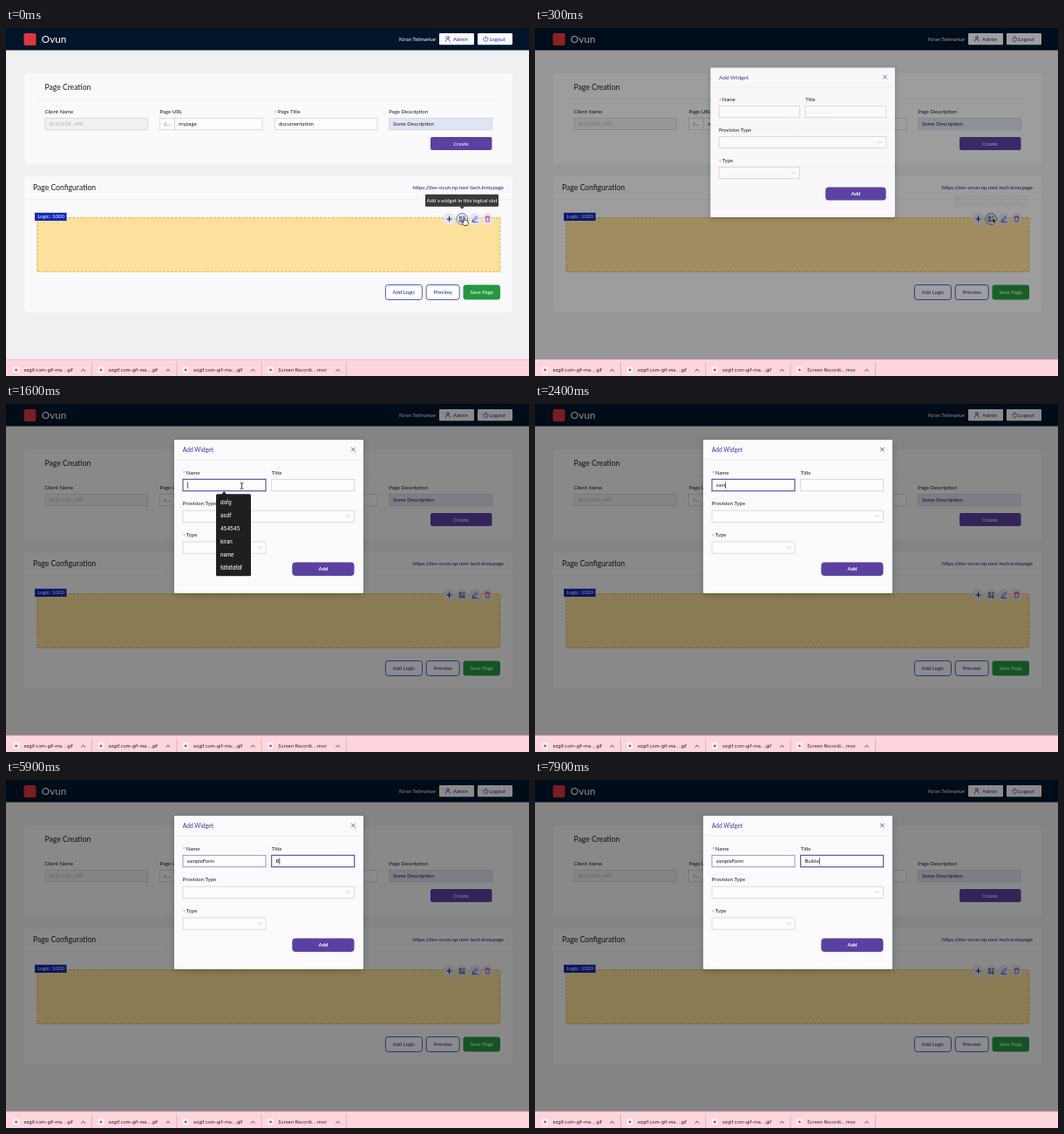
Recreate the animation shown at these times as an HTML page. Size 600 by 399 pixels, loop 8 s.

```html
<!DOCTYPE html>
<html lang="en">
<head>
<meta charset="utf-8">
<title>Page builder</title>
<style>
  html, body { margin: 0; width: 100%; height: 100%; overflow: hidden; background: #f0eff1; }
  svg { display: block; width: 600px; height: 399px; font: 6px Lato, sans-serif; fill: #1d1c25; }
  .line { fill: none; stroke-linecap: round; stroke-linejoin: round; }
  .head { font-size: 8.6px; }
  .card { fill: #faf9fb; }
  .rule { stroke: #ebeaee; stroke-width: .7; }
  .box { fill: #fefdff; stroke: #d3d1d7; stroke-width: .8; }
  .off { fill: #f1f0f2; }
  .mid { text-anchor: middle; }
  .end { text-anchor: end; }
  .white { fill: #fff; }
  .blue { fill: #172a9c; }
  .star { fill: #e5393f; }
  .violet { fill: #5a41a1; }
  .outline { fill: #fdfcff; stroke: #2439bd; stroke-width: .8; }
  .system { font-family: Inter, "Open Sans", sans-serif; font-size: 5.35px; }
  .suggest { font-family: Inter, "Open Sans", sans-serif; font-size: 5.9px; font-weight: 500; fill: #f4f4f6; }
</style>
</head>
<body>
<svg viewBox="0 0 600 399" xmlns="http://www.w3.org/2000/svg">
  <defs>
    <filter id="soft" x="-20%" y="-20%" width="140%" height="150%">
      <feDropShadow dx="0" dy="2" stdDeviation="4" flood-opacity=".2"/>
    </filter>
    <clipPath id="listClip"><rect x="241" y="103" width="40" height="87"/></clipPath>
    <path id="down" class="line" d="M-2.2-1.1 0 1.1 2.2-1.1" stroke="#bbb9c0" stroke-width=".7"/>
    <g id="file">
      <rect x="8.6" y="388.3" width="6" height="7" rx="1" fill="#fdf4f7"/>
      <circle cx="11.6" cy="392" r="1.5" fill="#6f7583"/>
      <path class="line" d="M86.6 393.3l2-2 2 2" stroke="#3b3338" stroke-width=".9"/>
      <path d="M98.5 383v16" stroke="#dba8b4" stroke-width=".8"/>
    </g>
  </defs>

  <rect width="600" height="399" fill="#f0eff1"/>

  <!-- header -->
  <rect width="600" height="25.5" fill="#001529"/>
  <rect x="20.5" y="6" width="14" height="14" rx="2" fill="#de363d"/>
  <text x="40.8" y="17" class="white" font-size="11.7">Ovun</text>
  <text x="493.5" y="14.8" class="white end">Kiran Telimarkar</text>
  <g fill="#fdfdff">
    <rect x="497" y="6" width="40" height="13.3" rx="1"/>
    <rect x="541" y="6" width="40" height="13.3" rx="1"/>
  </g>
  <g class="line" stroke="#172a9c" stroke-width=".7">
    <circle cx="506.8" cy="11" r="1.4"/>
    <path d="M504.3 15.3a2.5 2.5 0 0 1 5 0M548.9 10.6a2.6 2.6 0 1 0 2.8 0M550.3 9.6v2.8"/>
  </g>
  <text x="513" y="14.7" class="blue">Admin</text>
  <text x="554.5" y="14.7" class="blue">Logout</text>

  <!-- page creation -->
  <rect x="21" y="52" width="560" height="103.5" rx="4" class="card"/>
  <text x="44.5" y="71" class="head" font-size="8.9">Page Creation</text>
  <path d="M36 82h530" class="rule"/>
  <text x="44.5" y="98">Client Name</text>
  <text x="176.5" y="98">Page URL</text>
  <text x="308" y="98.8" class="star">*</text>
  <text x="312" y="98">Page Title</text>
  <text x="439.3" y="98">Page Description</text>
  <rect x="45" y="103.4" width="117.5" height="13.3" class="box off"/>
  <rect x="176.5" y="103.4" width="17" height="13.3" class="box"/>
  <rect x="193.5" y="103.4" width="100.5" height="13.3" class="box"/>
  <rect x="308.2" y="103.4" width="117.8" height="13.3" class="box"/>
  <rect x="439.7" y="103.4" width="118" height="13.3" class="box" style="fill:#dfe5f4"/>
  <text x="49.8" y="112.2" style="fill:#b5b4ba">BUILDER_APP</text>
  <text x="181" y="112.2">/...</text>
  <text x="198.3" y="112.2">mypage</text>
  <text x="313" y="112.2">documentation</text>
  <text x="444" y="112.2">Some Description</text>
  <rect x="487" y="125" width="70.5" height="15" rx="2" class="violet"/>
  <text x="522" y="134.6" class="white mid">Create</text>

  <!-- page configuration -->
  <rect x="21" y="169.5" width="560" height="156.5" rx="4" class="card"/>
  <text x="31" y="186.2" class="head">Page Configuration</text>
  <text x="571" y="185.4" class="end" style="fill:#27197f">https://dev-ovun.np.navi-tech.inmypage</text>
  <path d="M21 196.7h560" class="rule"/>
  <rect x="35.8" y="217.6" width="531" height="61.8" fill="#fde09b" stroke="#e6b43c" stroke-width="1" stroke-dasharray="3 1.5"/>
  <rect x="33" y="211.8" width="36.5" height="9.2" fill="#1028b6"/>
  <text x="36.3" y="218.3" class="white">Logic: 1000</text>
  <g fill="#e2e4ee">
    <circle cx="508.5" cy="219" r="6.7"/><circle cx="523.2" cy="219" r="6.7"/>
    <circle cx="537.9" cy="219" r="6.7"/><circle cx="552.5" cy="219" r="6.7"/>
  </g>
  <circle id="ring" cx="523.2" cy="219" r="6.4" fill="none" stroke="#4a5fb4" stroke-width=".8"/>
  <g class="line" stroke-width=".9">
    <path d="M505.9 219h5.2M508.5 216.4v5.2" stroke="#0d1230"/>
    <path d="M520.6 216.4h2v2h-2zM520.6 220h2v2h-2zM524.4 216.3h1.8M524.4 218.3h1.8M524.4 220h1.8v2h-1.8z" stroke="#1c2452" stroke-width=".7"/>
    <path d="M535.8 219.7l3.6-3.6 1.4 1.4-3.6 3.6-1.8.4zM535 222.6h6" stroke="#1e38c8" stroke-width=".8"/>
    <path d="M549.9 217h5.2M551.5 217v-1.1h2v1.1M550.5 217.2l.3 4.8h3.4l.3-4.8" stroke="#d2284f" stroke-width=".8"/>
  </g>
  <rect x="435.4" y="294.5" width="42" height="17" rx="3" class="outline"/>
  <rect x="482.2" y="294.5" width="38" height="17" rx="3" class="outline"/>
  <rect x="524.5" y="294.5" width="42.5" height="17" rx="3" fill="#259840"/>
  <text x="456.4" y="305.1" class="blue mid">Add Logic</text>
  <text x="501.2" y="305.1" class="blue mid">Preview</text>
  <text x="545.7" y="305.1" class="white mid">Save Page</text>

  <rect id="mask" width="600" height="380" fill="#000" opacity="0"/>

  <g id="tip">
    <rect x="481" y="190.8" width="84" height="14" rx="1" fill="#39393c"/>
    <path d="M520.2 204.6h6l-3 3.2z" fill="#39393c"/>
    <text x="523" y="199.9" class="white mid">Add a widget in this logical slot</text>
  </g>

  <!-- dialog -->
  <g id="dialog" opacity="0">
    <rect x="193" y="41" width="217" height="176" rx="1" fill="#fcfafd" filter="url(#soft)"/>
    <text x="202.8" y="54.6" font-size="6.7" style="fill:#4a2f9c">Add Widget</text>
    <path class="line" d="M396.4 50l4 4.2M400.4 50l-4 4.2" stroke="#4a3f8f" stroke-width=".8"/>
    <path d="M193 63.8h217" class="rule"/>
    <text x="203" y="81.3" class="star">*</text>
    <text x="206.8" y="80.6">Name</text>
    <text x="304.7" y="80.6">Title</text>
    <rect id="nameBox" x="203" y="86.3" width="95" height="13.4" class="box"/>
    <rect id="titleBox" x="304.7" y="86.3" width="95" height="13.4" class="box"/>
    <text id="nameText" x="207.7" y="95.1" font-size="5.9"></text>
    <text id="titleText" x="309.5" y="95.1" font-size="5.9"></text>
    <rect id="caret" y="89.3" width=".7" height="7.4" fill="#14121d" opacity="0"/>
    <text x="202.8" y="116.4">Provision Type</text>
    <rect x="203" y="122.2" width="196.7" height="13.2" class="box"/>
    <use href="#down" x="392.6" y="128.8"/>
    <text x="203" y="152.9" class="star">*</text>
    <text x="206.8" y="152.2">Type</text>
    <rect x="203" y="158" width="95" height="13.2" class="box"/>
    <use href="#down" x="291" y="164.7"/>
    <rect x="328.3" y="181.6" width="71.2" height="15.4" rx="4" class="violet"/>
    <text x="364" y="191.4" class="white mid" font-weight="700">Add</text>
  </g>

  <g id="list" visibility="hidden">
    <path d="M247.2 104l3-4 3 4z" fill="#1f1f22"/>
    <rect x="241" y="103.3" width="40" height="94" rx="1.5" fill="#1f1f22"/>
    <g class="suggest" clip-path="url(#listClip)">
      <text x="246" y="115">dsfg</text>
      <text x="246" y="130">asdf</text>
      <text x="246" y="145">454545</text>
      <text x="246" y="160">kiran</text>
      <text x="246" y="175">name</text>
      <text x="246" y="190.3">fdfdfdfdf</text>
    </g>
  </g>

  <!-- downloads bar -->
  <rect y="380" width="600" height="19" fill="#ffd5dd"/>
  <path d="M0 380.2h600" stroke="#ddb0bb" stroke-width=".7"/>
  <use href="#file"/><use href="#file" x="97.3"/><use href="#file" x="194.6"/><use href="#file" x="291.9"/>
  <g class="system">
    <text x="20.4" y="394">ezgif.com-gif-ma....gif</text>
    <text x="117.7" y="394">ezgif.com-gif-ma....gif</text>
    <text x="215" y="394">ezgif.com-gif-ma....gif</text>
    <text x="312.3" y="394">Screen Recordi....mov</text>
  </g>

  <g id="pointer" stroke-linejoin="round">
    <path id="hand" d="M0 .6q.9-.9 1.5.1v2.2q1.2-.4 1.4.4 1.2-.2 1.3.6 1-.1 1 .8v1.7q-.2 1.6-1 2.6H.6Q-.8 7.300-2 5.600q0-1 1-.6l1 .8z" fill="#fff" stroke="#111" stroke-width=".7"/>
    <path id="arrow" d="M0 0v6.400l1.500-1.400 1.100 2.500 1.200-.5-1.100-2.400h2.100z" fill="#111" stroke="#fff" stroke-width=".4"/>
    <path id="beam" class="line" d="M-1.500-3.500q1.300 0 1.500.8.200-.8 1.500-.8M0-2.700v5.400M-1.500 3.500q1.300 0 1.500-.8.200.8 1.500.8" stroke="#17161c" stroke-width=".8"/>
  </g>
</svg>
<script>
const LOOP = 8000, TICK = 100;
const OPEN = 135, CLICK = 1200, LIST = 1300, TAB = 3700;
const NAME = 'sampleForm', TITLE = 'Builde';
const NAME_KEYS = [2100, 2200, 2400, 2500, 2700, 2800, 3100, 3200, 3300, 3500];
const TITLE_KEYS = [5800, 6200, 6400, 6800, 7300, 7700];

const el = {};
document.querySelectorAll('svg [id]').forEach(n => el[n.id] = n);

const clamp = v => Math.max(0, Math.min(1, v));
const span = (t, from, length) => clamp((t - from) / length);
const smooth = p => p * p * (3 - 2 * p);
const show = (node, on) => node.setAttribute('visibility', on ? 'visible' : 'hidden');
const fade = (node, v) => node.setAttribute('opacity', v);

// cubic-bezier(.08, .82, .17, 1)
function zoomEase(x) {
  const curve = (a, b, u) => 3 * a * u * (1 - u) ** 2 + 3 * b * u * u * (1 - u) + u ** 3;
  let lo = 0, hi = 1;
  for (let i = 0; i < 24; i++) {
    const u = (lo + hi) / 2;
    if (curve(.08, .17, u) < x) lo = u; else hi = u;
  }
  return curve(.82, 1, lo);
}

function type(node, text, keys, t) {
  const count = keys.filter(k => k <= t).length;
  const value = text.slice(0, count);
  if (node.textContent !== value) node.textContent = value;
}

function outline(box, focus, hover) {
  box.style.stroke = focus ? '#55449c' : hover ? '#8b7cc0' : '#d3d1d7';
  box.style.strokeWidth = focus ? 1.1 : .8;
}

function drawCaret(t) {
  const active = t < TAB ? el.nameText : el.titleText;
  const last = Math.max(...[CLICK, TAB, ...NAME_KEYS, ...TITLE_KEYS].filter(k => k <= t));
  const lit = t >= CLICK && (t - last) % 1000 < 500;
  const width = active.textContent ? active.getComputedTextLength() : 0;
  el.caret.setAttribute('x', +active.getAttribute('x') + width + .2);
  fade(el.caret, lit ? 1 : 0);
}

function drawPointer(t) {
  const p = smooth(span(t, 400, 650));
  const x = 525 + (270.5 - 525) * p, y = 217.5 + (94 - 217.5) * p;
  el.pointer.setAttribute('transform', `translate(${x} ${y})`);
  const typing = t >= NAME_KEYS[0];
  show(el.hand, t < 200);
  show(el.arrow, t >= 200 && t < 1000);
  show(el.beam, t >= 1000 && !typing);
}

function render(t) {
  const zoom = zoomEase(span(t, OPEN, 300)), scale = .2 + .8 * zoom;
  fade(el.mask, .45 * span(t, OPEN, 200));
  fade(el.tip, t < TICK ? 1 : 1 - span(t, 60, 250));
  fade(el.dialog, zoom);
  el.dialog.setAttribute('transform', `translate(525 219) scale(${scale}) translate(-525 -219)`);
  show(el.ring, t < 500);
  show(el.list, t >= LIST && t < NAME_KEYS[0]);
  outline(el.nameBox, t >= CLICK && t < TAB, t >= 1000);
  outline(el.titleBox, t >= TAB, false);
  type(el.nameText, NAME, NAME_KEYS, t);
  type(el.titleText, TITLE, TITLE_KEYS, t);
  drawCaret(t);
  drawPointer(t);
}

const start = performance.now();
function loop() {
  const t = (performance.now() - start) % LOOP;
  render(Math.floor(t / TICK) * TICK);
  requestAnimationFrame(loop);
}
loop();
</script>
</body>
</html>
```
